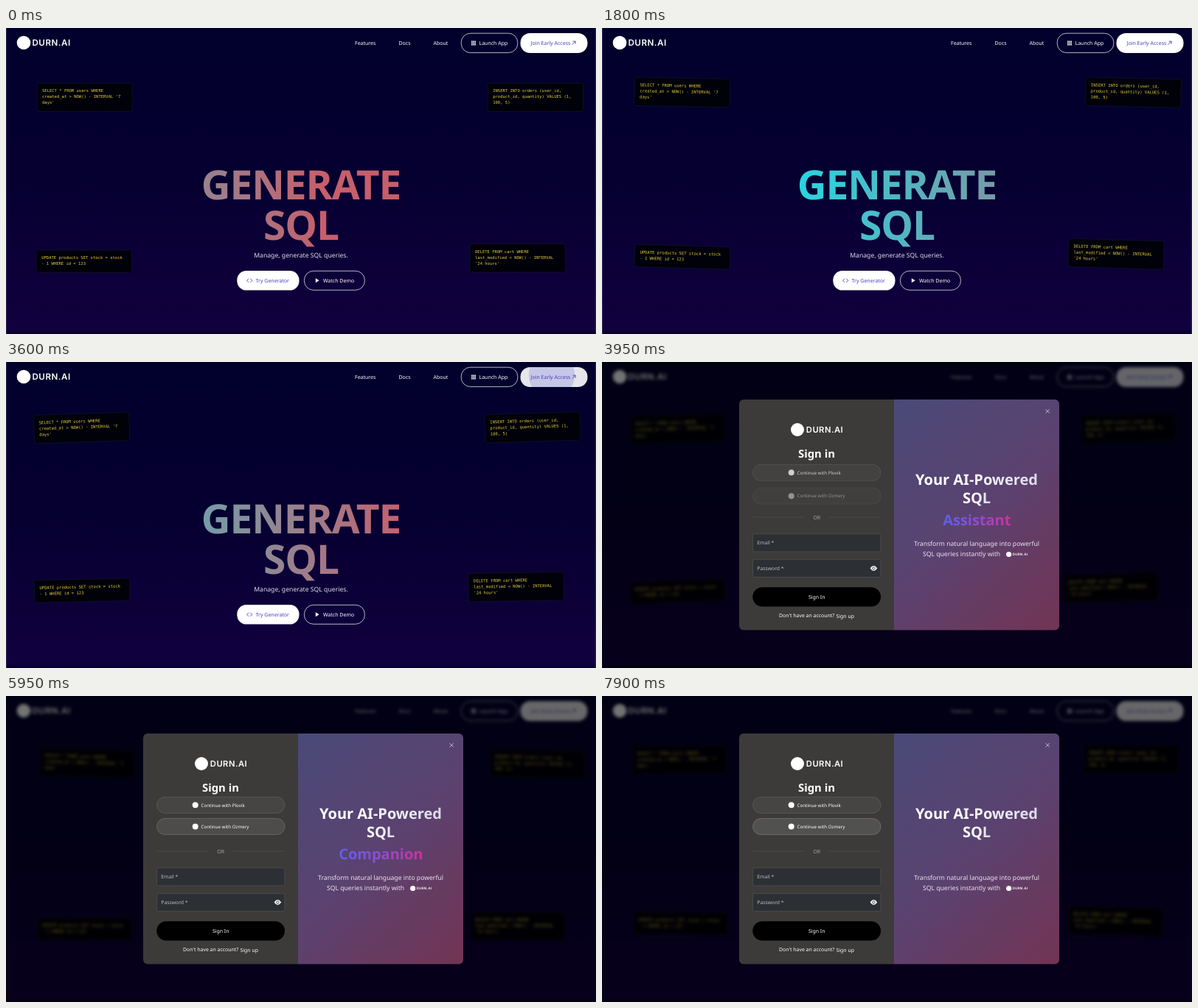
An HTML page that plays this animation: 800 px wide and 416 px high, repeating every 8 s.

```html
<!DOCTYPE html>
<html lang="en">
<head>
<meta charset="utf-8">
<title>Generate SQL</title>
<style>
html, body { margin: 0; width: 100%; height: 100%; overflow: hidden; background: #02001e; }
svg { display: block; width: 100vw; height: 100vh; }
text { font-family: "Noto Sans", "Open Sans", sans-serif; font-size: 7px; fill: #fff; text-rendering: geometricPrecision; white-space: pre; }
.mid { text-anchor: middle; }
.bold { font-weight: 700; }
.blue { fill: #4540c4; }
.code { font-family: "DejaVu Sans Mono", "Noto Sans Mono", monospace; font-size: 5.53px; fill: #e6d23c; }
.brand { font-family: Inter, "DejaVu Sans", sans-serif; font-weight: 600; }
.hero { font-size: 55px; letter-spacing: -1.1px; fill: url(#heroFill); }
.lead { font-size: 20px; fill: url(#leadFill); }
.para { font-size: 8.65px; fill: #e9e6f0; }
.small { font-size: 6.2px; font-weight: 500; }
.label { font-size: 6.8px; fill: #b9bbbd; }
.outline { fill: none; stroke: #fff; stroke-width: .7; }
.field { fill: #2c3035; stroke: #54585c; stroke-width: .6; }
</style>
</head>
<body>
<svg viewBox="0 0 800 416" preserveAspectRatio="none">
  <defs>
    <linearGradient id="pageFill" x2="0" y2="1">
      <stop offset="0" stop-color="#02002c"/>
      <stop offset=".5" stop-color="#060030"/>
      <stop offset="1" stop-color="#11003f"/>
    </linearGradient>
    <linearGradient id="heroFill" gradientUnits="userSpaceOnUse" y1="0" y2="0">
      <stop offset="0" stop-color="#28d6e2"/>
      <stop offset="1" stop-color="#c65f6b"/>
    </linearGradient>
    <linearGradient id="leadFill">
      <stop offset=".3" stop-color="#fff"/>
      <stop offset="1" stop-color="#dcdaea"/>
    </linearGradient>
    <linearGradient id="wordFill">
      <stop offset="0" stop-color="#5a62ea"/>
      <stop offset=".5" stop-color="#8f4bd2"/>
      <stop offset="1" stop-color="#d0309a"/>
    </linearGradient>
    <linearGradient id="sideFill" gradientUnits="userSpaceOnUse" x1="374" y1="73" x2="642" y2="343">
      <stop offset="0" stop-color="#4a4a78"/>
      <stop offset=".5" stop-color="#5b4270"/>
      <stop offset="1" stop-color="#723453"/>
    </linearGradient>
    <filter id="blur" filterUnits="userSpaceOnUse" x="0" y="0" width="800" height="416" color-interpolation-filters="sRGB">
      <feGaussianBlur id="blurAmount" stdDeviation="0"/>
    </filter>
    <clipPath id="joinClip"><rect x="697.5" y="7" width="91" height="27" rx="13"/></clipPath>
    <clipPath id="dialogClip"><rect x="186" y="51" width="434" height="313.5" rx="6"/></clipPath>
  </defs>

  <g id="page">
    <rect width="800" height="416" fill="url(#pageFill)"/>
    <rect y="411.5" width="800" height="4.5" fill="#04001c" opacity=".5"/>
    <path d="M.5 0V416M799.3 0V416" stroke="#34345c" stroke-width=".8"/>

    <circle cx="24" cy="20" r="9.3" fill="#fff"/>
    <text class="brand" x="35.5" y="24.3" style="font-size:11.6px;letter-spacing:.5px">DURN.AI</text>

    <text x="473" y="23">Features</text>
    <text x="532.5" y="23">Docs</text>
    <text x="579.5" y="23">About</text>

    <rect id="launch" class="outline" x="617.2" y="7.2" width="76.6" height="26.4" rx="12.5"/>
    <path d="M631 18.2h6M631 20.4h6M631 22.6h6" stroke="#fff" stroke-width="1.6" stroke-dasharray="1.6 .6"/>
    <text x="641.5" y="23">Launch App</text>

    <rect id="join" x="697.5" y="7" width="91" height="27" rx="13"/>
    <g clip-path="url(#joinClip)"><circle id="ripple" cx="740" cy="17.5" fill="#4848dc"/></g>
    <text class="blue" x="711.5" y="23">Join Early Access</text>
    <path d="M767.6 22.7L772 18.2M768.6 18.1H772.1V21.7" fill="none" stroke="#4540c4" stroke-width=".9"/>

    <g id="cards"></g>

    <text class="hero mid bold" x="400" y="233.4">GENERATE</text>
    <text class="hero mid bold" x="400" y="288.4">SQL</text>
    <text class="mid" x="400" y="311.8" style="font-size:8.67px;fill:#dddbe8">Manage, generate SQL queries.</text>

    <rect x="313.3" y="330" width="84.2" height="26.6" rx="12.5" fill="#fff"/>
    <path d="M329 340.8L326.6 343.3L329 345.8M331.4 340.8L333.8 343.3L331.4 345.8" fill="none" stroke="#4540c4" stroke-width=".9"/>
    <text class="blue" x="338.5" y="345.9">Try Generator</text>
    <rect class="outline" x="404.4" y="330.3" width="82" height="26" rx="12.5"/>
    <path d="M419.8 340.3V346.3L424.6 343.3Z" fill="#fff"/>
    <text x="430" y="345.9">Watch Demo</text>
  </g>

  <g id="status">
    <path d="M0 405.5H61.5Q64 405.5 64 408V416H0Z" fill="#29292f"/>
    <text x="2.5" y="413" style="font-size:6.3px;fill:#c4c4c8">localhost:3000/chat</text>
  </g>

  <g id="modal">
    <rect width="800" height="416" fill="#000" opacity=".55"/>
    <g clip-path="url(#dialogClip)">
      <rect x="186" y="51" width="210.5" height="314" fill="#3c3b39"/>
      <rect x="396" y="51" width="224" height="314" fill="url(#sideFill)"/>
    </g>
    <circle cx="265" cy="92" r="9" fill="#fff"/>
    <text class="brand" x="276.8" y="96" style="font-size:11.2px;letter-spacing:.5px">DURN.AI</text>
    <text class="mid bold" x="291" y="130" style="font-size:14.8px">Sign in</text>

    <g id="logins"></g>

    <path d="M204.5 211H274M308 211H378" stroke="#555451" stroke-width=".6"/>
    <text class="mid" x="291.2" y="213.6" style="fill:#a3a3a1">OR</text>

    <rect class="field" x="204.6" y="233.7" width="173.2" height="24.2" rx="1.7"/>
    <text class="label" x="210.3" y="247.9">Email *</text>
    <rect class="field" x="204.6" y="268.4" width="173.2" height="24.2" rx="1.7"/>
    <text class="label" x="210.3" y="282.7">Password *</text>
    <path d="M363.6 280.5Q368.4 273.6 373.2 280.5Q368.4 287.4 363.6 280.5Z" fill="#fff"/>
    <circle cx="368.4" cy="280.5" r="1.7" fill="#fff" stroke="#2c3035" stroke-width=".9"/>

    <rect x="204.3" y="306.2" width="173.7" height="26.4" rx="13" fill="#000"/>
    <text class="mid" x="291.2" y="321.9" style="font-size:6.9px">Sign In</text>
    <text x="240" y="346.9" style="font-size:6.92px">Don't have an account?</text>
    <text x="317.5" y="347.7" style="font-size:6.92px">Sign up</text>

    <path d="M601.6 64.2L606.8 69.4M606.8 64.2L601.6 69.4" stroke="#c9c7d6" stroke-width=".9"/>
    <text class="lead mid bold" x="508" y="167">Your AI-Powered</text>
    <text class="lead mid bold" x="508" y="192.2">SQL</text>
    <text id="word" class="mid bold" x="508.3" y="221.8" style="font-size:20px;fill:url(#wordFill)"></text>
    <text class="para mid" x="508" y="250">Transform natural language into powerful</text>
    <text class="para" x="435" y="264">SQL queries instantly with</text>
    <circle cx="551.6" cy="261.5" r="3.6" fill="#fff"/>
    <text class="brand" x="556.5" y="263.2" style="font-size:4.6px;letter-spacing:.2px">DURN.AI</text>
  </g>
</svg>

<script>
const LOOP = 8000;
const OPEN = 3690;
const $ = id => document.getElementById(id);
const set = (el, attrs) => { for (const k in attrs) el.setAttribute(k, attrs[k]); };
const clamp = v => Math.min(1, Math.max(0, v));
const ramp = (t, start, length) => clamp((t - start) / length);
const easeInOut = p => p * p * (3 - 2 * p);
const easeOut = p => 1 - (1 - p) ** 2;

function add(parent, tag, attrs, text) {
  const el = document.createElementNS("http://www.w3.org/2000/svg", tag);
  set(el, attrs);
  if (text) el.textContent = text;
  return parent.appendChild(el);
}

const cards = [
  { x: 42, y: 75, period: 5000, lines: ["SELECT * FROM users WHERE", "created_at > NOW() - INTERVAL '7", "days'"] },
  { x: 653.2, y: 75, period: 5200, lines: ["INSERT INTO orders (user_id,", "product_id, quantity) VALUES (1,", "100, 5)"] },
  { x: 41.2, y: 302, period: 5600, lines: ["UPDATE products SET stock = stock", "- 1 WHERE id = 123"] },
  { x: 629, y: 293.6, period: 5900, lines: ["DELETE FROM cart WHERE", "last_modified < NOW() - INTERVAL", "'24 hours'"] }
];

for (const card of cards) {
  card.h = 14.2 + card.lines.length * 8.1;
  card.el = add($("cards"), "g", {});
  add(card.el, "rect", { width: 129.3, height: card.h, rx: 3, fill: "#01010a", stroke: "#17172c", "stroke-width": .6 });
  card.lines.forEach((line, i) => add(card.el, "text", { class: "code", x: 7, y: 12.2 + i * 8.1 }, line));
}

const logins = ["Plovik", "Ozmery"].map((name, i) => {
  const el = add($("logins"), "g", {});
  const y = 137.3 + i * 29.2;
  const box = add(el, "rect", { x: 204.5, y, width: 173.5, height: 22, rx: 11, fill: "#fff", stroke: "#fff", "stroke-opacity": .16, "stroke-width": .7 });
  add(el, "circle", { cx: 256.7, cy: y + 11, r: 4, fill: "#fff" });
  add(el, "text", { class: "small", x: 264.5, y: y + 13.2 }, "Continue with " + name);
  return { el, box };
});

// Eased path through evenly spaced values
function keyed(p, values) {
  const at = p * (values.length - 1);
  const i = Math.floor(at);
  return values[i] + (values[i + 1] - values[i]) * easeInOut(at - i);
}

function drawCards(t) {
  for (const { el, x, y, h, period } of cards) {
    const p = (t + 30) % period / period;
    const sway = keyed(p, [0, 1, 0, -1, 0]);
    const lift = keyed(p, [0, -8.3, 0]);
    el.setAttribute("transform", `translate(${x + sway * 4.1} ${y + lift}) rotate(${sway * 2} 64.6 ${h / 2})`);
  }
}

function drawHeader(t) {
  const launch = ramp(t, 2150, 250) - ramp(t, 2900, 250);
  set($("launch"), { style: `fill:rgba(255,255,255,${launch * .3})` });
  $("status").style.opacity = ramp(t, 2280, 100) - ramp(t, 3080, 150);
  const tone = 255 - 25 * ramp(t, 3050, 250);
  set($("join"), { fill: `rgb(${tone},${tone},${tone + 4})` });
  set($("ripple"), {
    r: 62 * easeInOut(ramp(t, 3350, 500)),
    opacity: .2 * (t >= 3350) * (1 - ramp(t, 3620, 400))
  });
}

function drawHero(t) {
  const shift = .7 * (1 - Math.cos((t - 2000) / 8000 * 2 * Math.PI));
  const left = 266 - shift * 540;
  set($("heroFill"), { x1: left, x2: left + 540 });
}

function drawWord(t) {
  const second = t >= 5640;
  const [enter, leave] = second ? [5640, 7680] : [OPEN, 5490];
  const shown = ramp(t, enter, 200);
  const gone = ramp(t, leave, 150);
  const word = $("word");
  word.textContent = second ? "Companion" : "Assistant";
  set(word, {
    opacity: shown * (1 - gone),
    transform: `translate(0 ${6 * (1 - easeOut(shown)) - 6 * gone})`
  });
}

function drawModal(t) {
  const p = easeInOut(ramp(t, OPEN, 225));
  const modal = $("modal");
  modal.style.display = p ? "" : "none";
  modal.style.opacity = p;
  set($("blurAmount"), { stdDeviation: 2 * p });
  if (p) $("page").setAttribute("filter", "url(#blur)");
  else $("page").removeAttribute("filter");

  logins.forEach(({ el, box }, i) => {
    const q = easeOut(ramp(t, 3750 + i * 100, 400));
    set(el, { opacity: q, transform: `translate(0 ${8.3 * (1 - q)})` });
    const hover = i ? ramp(t, 5800, 250) : 0;
    set(box, { "fill-opacity": .05 + .06 * hover, "stroke-opacity": .16 + .1 * hover });
  });
  drawWord(t);
}

function frame(now) {
  const t = now % LOOP;
  drawCards(t);
  drawHeader(t);
  drawHero(t);
  drawModal(t);
  requestAnimationFrame(frame);
}
frame(performance.now());
</script>
</body>
</html>
```
